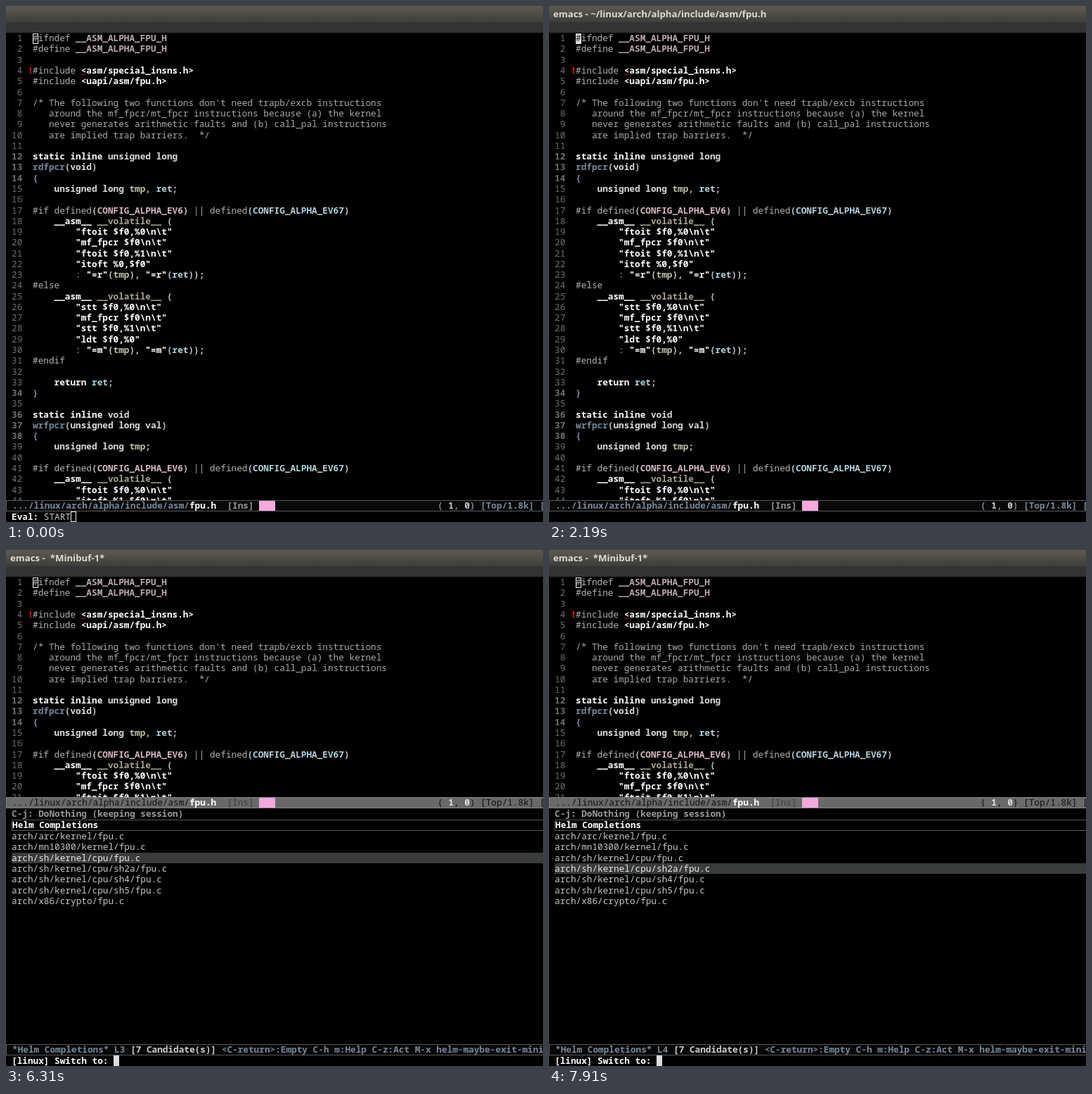
These frames come from a looping animation (764 px wide and 733 px high, 8000 ms). An HTML page with a canvas:

```html
<!DOCTYPE html>
<html lang="en">
<head>
<meta charset="utf-8">
<title>Switching to a matching file</title>
<style>
html, body { margin: 0; width: 100%; height: 100%; overflow: hidden; background: #000; }
canvas { display: block; }
</style>
</head>
<body>
<canvas id="stage" width="764" height="733"></canvas>
<script>
const ctx = document.getElementById('stage').getContext('2d');
const WIDTH = 764, HEIGHT = 733, LOOP = 8000;
const CELL = 7.636, ROW = 15.27, ASCENT = 12.2;
const MARGIN = 8, CODE_X = 38, CODE_Y = 38;
const GREY = '#b4b4b4', SLATE = '#778899', WHITE = '#fff', LIGHT = '#dcdcdc';

const code = String.raw`#ifndef __ASM_ALPHA_FPU_H
#define __ASM_ALPHA_FPU_H

#include <asm/special_insns.h>
#include <uapi/asm/fpu.h>

/* The following two functions don't need trapb/excb instructions
   around the mf_fpcr/mt_fpcr instructions because (a) the kernel
   never generates arithmetic faults and (b) call_pal instructions
   are implied trap barriers.  */

static inline unsigned long
rdfpcr(void)
{
    unsigned long tmp, ret;

#if defined(CONFIG_ALPHA_EV6) || defined(CONFIG_ALPHA_EV67)
    __asm__ __volatile__ (
        "ftoit $f0,%0\n\t"
        "mf_fpcr $f0\n\t"
        "ftoit $f0,%1\n\t"
        "itoft %0,$f0"
        : "=r"(tmp), "=r"(ret));
#else
    __asm__ __volatile__ (
        "stt $f0,%0\n\t"
        "mf_fpcr $f0\n\t"
        "stt $f0,%1\n\t"
        "ldt $f0,%0"
        : "=m"(tmp), "=m"(ret));
#endif

    return ret;
}

static inline void
wrfpcr(unsigned long val)
{
    unsigned long tmp;

#if defined(CONFIG_ALPHA_EV6) || defined(CONFIG_ALPHA_EV67)
    __asm__ __volatile__ (
        "ftoit $f0,%0\n\t"
        "itoft %1,$f0\n\t"`.split('\n');

const files = ['arc/kernel', 'mn10300/kernel', 'sh/kernel/cpu', 'sh/kernel/cpu/sh2a',
  'sh/kernel/cpu/sh4', 'sh/kernel/cpu/sh5', 'x86/crypto'].map(dir => `arch/${dir}/fpu.c`);

// Bold tokens and their colours; everything else is plain grey.
const boldTokens = [
  [/^["<]|^(static|inline|return|__asm__)$/, WHITE],
  [/^(unsigned|long|void|val)$/, LIGHT],
  [/^(rdfpcr|wrfpcr|[{}])$/, SLATE],
  [/^__ASM_ALPHA_FPU_H$/, '#bcaab0'],
  [/^CONFIG_ALPHA_EV6$/, '#d8b8c4'],
  [/^(CONFIG_ALPHA_EV67|ret)$/, '#b4d3dd'],
  [/^tmp$/, '#bcc0a8'],
  [/^__volatile__$/, '#aca294'],
  [/^[(),;]$/, '#c4c4c4']
];

function rect(x, y, w, h, color) {
  ctx.fillStyle = color;
  ctx.fillRect(x, y, w, h);
}

function outline(x, y, w, h, color) {
  ctx.strokeStyle = color;
  ctx.lineWidth = 1;
  ctx.strokeRect(x + 0.5, y + 0.5, w - 1, h - 1);
}

// Writes on the character grid and returns the x after the last cell.
function write(text, x, top, color, bold = false) {
  ctx.font = `${bold ? 'bold ' : ''}12.727px "Noto Sans Mono", monospace`;
  ctx.fillStyle = color;
  for (const char of text) {
    if (char !== ' ') ctx.fillText(char, x, top + ASCENT);
    x += CELL;
  }
  return x;
}

function cursor(x, y, solid) {
  if (solid) rect(x, y, 8, 15, '#dcdcdc');
  else outline(x, y, 8, 15, '#f0f0f0');
}

function drawTitle(title) {
  const shade = ctx.createLinearGradient(0, 0, 0, 23);
  shade.addColorStop(0, '#5d5a51');
  shade.addColorStop(1, '#3e3d38');
  rect(0, 0, WIDTH, 23, shade);
  rect(0, 23, WIDTH, 15, '#333');
  ctx.font = 'bold 13.23px "Noto Sans", sans-serif';
  ctx.fillStyle = '#dfdbd2';
  ctx.fillText(title, 6, 16);
}

function drawCode(bottom, solidCursor) {
  ctx.save();
  ctx.beginPath();
  ctx.rect(0, CODE_Y, WIDTH, bottom - CODE_Y);
  ctx.clip();
  code.forEach((line, i) => {
    const top = CODE_Y + i * ROW;
    const boldNumber = /^[a-z{}]/.test(line);
    write(String(i + 1).padStart(2), MARGIN, top, '#707070', boldNumber);
    if (/^(\/\*|   \S)/.test(line)) {
      write(line, CODE_X, top, '#a8abab');
      return;
    }
    let x = CODE_X;
    for (const token of line.match(/"[^"]*"|<.*>|\w+|\W/g) || []) {
      const style = boldTokens.find(([pattern]) => pattern.test(token));
      x = write(token, x, top, style ? style[1] : GREY, !!style);
    }
  });
  write('!', 31, CODE_Y + 3 * ROW, '#f01818', true);
  rect(107, 97, 6, 1, '#a01818');
  cursor(CODE_X, CODE_Y + 1, solidCursor);
  if (solidCursor) write('#', CODE_X, CODE_Y, '#222');
  ctx.restore();
}

function drawModeLine(top, selected) {
  const ink = selected ? SLATE : '#101010';
  const bright = selected ? '#c8c8c8' : '#e0e0e0';
  rect(0, top, WIDTH, 16, selected ? '#080808' : '#696969');
  outline(0, top, WIDTH + 1, 16, selected ? '#585858' : '#808080');
  let x = write('.../linux/arch/alpha/include/asm/', 9, top, ink, selected);
  x = write('fpu.h', x, top, WHITE, true);
  write('  [Ins]', x, top, selected ? '#969696' : '#3c3c3c', selected);
  rect(360, top + 1, 23, 14, '#f3a9dc');
  x = write('( ', 614, top, ink, selected);
  x = write('1', x, top, bright, true);
  x = write(', ', x, top, ink, selected);
  x = write('0', x, top, bright, true);
  write(') [Top/1.8k] [', x, top, ink, selected);
}

function drawCompletions(selected) {
  write('C-j: DoNothing (keeping session)', MARGIN, 367, '#9c9c9c', true);
  outline(MARGIN, 383, WIDTH, 16, '#585858');
  write('Helm Completions', MARGIN + 1, 383, WHITE, true);
  files.forEach((file, i) => {
    const top = 399 + i * ROW;
    if (i === selected) rect(MARGIN, Math.round(top), WIDTH, 15, '#3a3c3c');
    write(file, MARGIN, top, i === selected ? '#e8e8e8' : '#c8c8c8');
  });
  rect(0, 702, WIDTH, 16, '#080808');
  outline(0, 702, WIDTH + 1, 16, '#585858');
  let x = write(`*Helm Completions* L${selected + 1} `, 9, 702, SLATE, true);
  x = write('[7 Candidate(s)]', x, 702, '#d0d0d0', true);
  const hint = selected ? 'M-x helm-maybe-exit-minibuffer' : 'RET/f1/f2/f-n:NthAct -----';
  write(` <C-return>:Empty C-h m:Help C-z:Act ${hint}`, x, 702, SLATE, true);
}

function titleAt(time) {
  if (time < 900) return '';
  return time >= 1740 && time < 4720
    ? 'emacs - ~/linux/arch/alpha/include/asm/fpu.h'
    : 'emacs -  *Minibuf-1*';
}

function selectionAt(time) {
  if (time >= 7910) return 3;
  return [5980, 6310, 6700, 7030].filter(start => time >= start).length;
}

function draw(time) {
  const listing = time >= 4720;
  const evaluating = time < 1690;
  rect(0, 0, WIDTH, HEIGHT, '#000');
  drawTitle(titleAt(time));
  drawCode(listing ? 351 : 702, !evaluating && !listing);
  drawModeLine(listing ? 351 : 702, !listing);
  if (listing) {
    drawCompletions(selectionAt(time));
    const x = write('[linux] Switch to: ', MARGIN, 718, WHITE, true);
    cursor(Math.round(x), 718, true);
  } else if (evaluating) {
    let x = write('Eval: ', MARGIN, 718, WHITE, true);
    x = write('START', x, 718, '#c8c8c8');
    cursor(Math.round(x), 718, time >= 840);
  } else if (time < 2190) {
    write('Quit', MARGIN, 718, '#c8c8c8');
  }
}

const start = performance.now();
function tick() {
  draw((performance.now() - start) % LOOP);
  requestAnimationFrame(tick);
}
tick();
</script>
</body>
</html>
```
